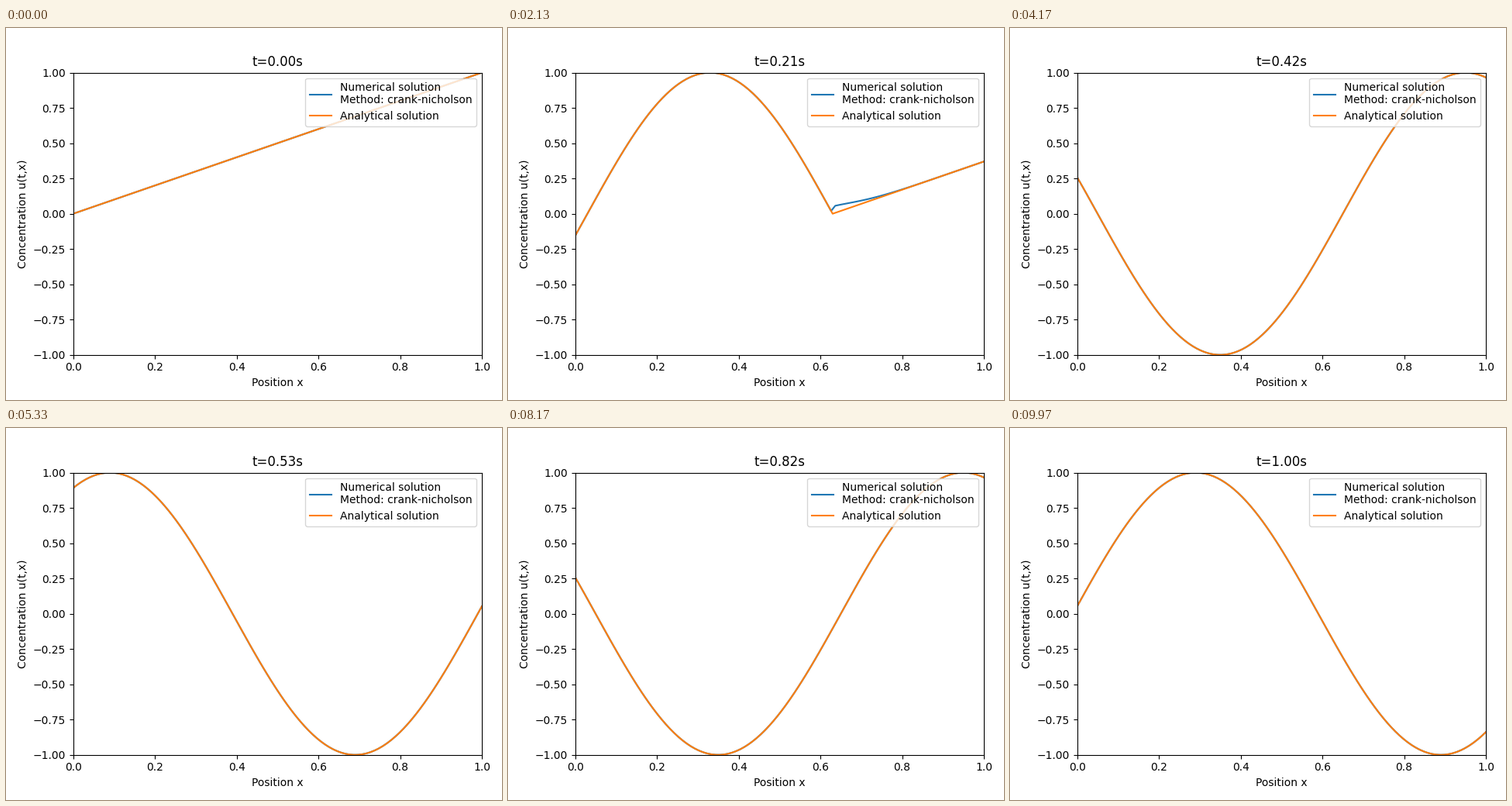
Write a matplotlib script that moves like this. It is 640 by 480 pixels and loops after 10 s.

```python
import numpy as np
import matplotlib.pyplot as plt
from matplotlib.animation import FuncAnimation

FRAMES = 300
LOOP_MS = 10000
SPEED = 3.0
OMEGA = 5 * np.pi
DT = 1 / FRAMES

x = np.linspace(0, 1, 100)
x_fine = np.linspace(0, 1, 1001)


def exact(t, pos):
    """Advected ramp with a sine fed in at the left edge."""
    lag = t - pos / SPEED
    return np.where(lag >= 0, np.sin(OMEGA * lag), pos - SPEED * t)


def solve():
    """Upwind Crank-Nicolson, with the inflow region prescribed."""
    half = SPEED * DT / (x[1] - x[0]) / 2
    eye = np.eye(x.size)
    diff = eye - np.eye(x.size, k=-1)
    diff[0] = 0
    step = np.linalg.solve(eye + half * diff, eye - half * diff)
    # Replace the first row's effect by the known inflow value.
    inflow = np.linalg.solve(eye + half * diff, eye[:, 0])
    u = x.copy()
    history = [u]
    for n in range(1, FRAMES):
        t = n * DT
        old_inflow = u[0]
        u = step @ u + inflow * (np.sin(OMEGA * t) - old_inflow)
        u = np.where(x <= SPEED * t, exact(t, x), u)
        history.append(u)
    return history


numerical = solve()

fig, ax = plt.subplots(figsize=(6.4, 4.8), dpi=100)
num_line, = ax.plot(x, numerical[0],
                    label="Numerical solution\nMethod: crank-nicholson")
ana_line, = ax.plot(x_fine, exact(0, x_fine), label="Analytical solution")
ax.set(xlim=(0, 1), ylim=(-1, 1),
       xlabel="Position x", ylabel="Concentration u(t,x)")
title = ax.set_title("t=0.00s")
ax.legend(loc="upper right")
fig.tight_layout()
fig.subplots_adjust(top=0.88)


def update(n):
    t = n * DT
    num_line.set_ydata(numerical[n])
    ana_line.set_ydata(exact(t, x_fine))
    title.set_text(f"t={t:.2f}s")
    return num_line, ana_line, title


anim = FuncAnimation(fig, update, frames=FRAMES, interval=LOOP_MS / FRAMES,
                     repeat=True)
plt.show()
```
